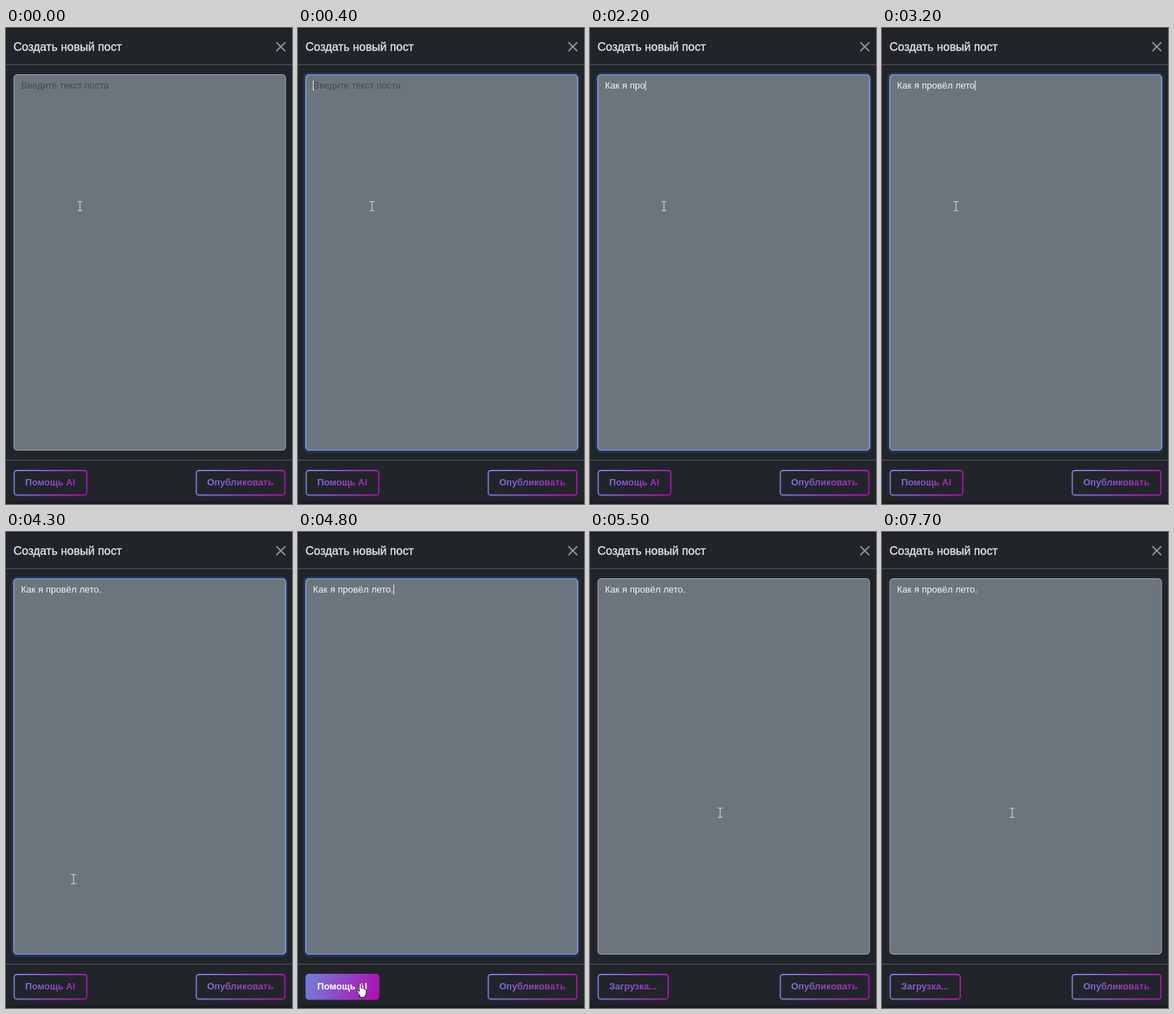
Animation of 402 by 668 pixels, one loop 8000 ms. Source, as an HTML page:

```html
<!DOCTYPE html>
<html lang="ru">
<head>
<meta charset="utf-8">
<style>
  html, body { margin: 0; width: 100%; height: 100%; overflow: hidden; background: #212529; }
  svg { display: block; width: 402px; height: 668px; }
  text { font: 13.07px "Liberation Sans", Arial, sans-serif; white-space: pre; }
  .title { font-size: 16.34px; fill: #e2e5e8; stroke: #e2e5e8; stroke-width: .35px; }
  .label { font-weight: bold; }
</style>
</head>
<body>
<svg viewBox="0 0 402 668">
  <defs>
    <linearGradient id="helpInk" gradientUnits="userSpaceOnUse" x1="11" y1="622" x2="114" y2="655">
      <stop stop-color="#7080dc"/><stop offset="1" stop-color="#b00cb0"/>
    </linearGradient>
    <linearGradient id="postInk" gradientUnits="userSpaceOnUse" x1="267" y1="622" x2="393" y2="655">
      <stop stop-color="#7080dc"/><stop offset="1" stop-color="#b00cb0"/>
    </linearGradient>
  </defs>

  <rect width="402" height="668" fill="#212529"/>
  <rect width="402" height="1" fill="#111417"/>
  <rect y="664" width="402" height="4" fill="#1a1d21"/>
  <path d="M0 51.5H402M0 606.5H402" stroke="#50565b"/>
  <text class="title" x="10.5" y="32">Создать новый пост</text>
  <path d="M380.5 20.5l11.5 11.5M392 20.5l-11.5 11.5" stroke="#909396" stroke-width="1.9" stroke-linecap="round"/>

  <rect id="ring" x="7.5" y="62.5" width="388.5" height="533.5" rx="7" fill="#22345a"/>
  <rect x="11" y="65.5" width="382" height="527" rx="4.5" fill="#6c757d" stroke="#a3abb1"/>
  <rect id="edge" x="11" y="65.5" width="382" height="527" rx="4.5" fill="none" stroke="#7c9fe4"/>
  <text id="hint" x="21.3" y="85" fill="#434a51">Введите текст поста</text>
  <text id="typed" x="21" y="85" fill="#f4f6f8"></text>
  <rect id="caret" y="74" width="1" height="14" fill="#f4f6f8"/>

  <rect id="help" x="11.5" y="621" width="102" height="34.5" rx="3.5" stroke="url(#helpInk)" stroke-width="1.8"/>
  <text id="helpLabel" class="label" x="27" y="642"></text>
  <rect x="267.5" y="621" width="124.5" height="34.5" rx="3.5" fill="none" stroke="url(#postInk)" stroke-width="1.8"/>
  <text class="label" x="282.7" y="642" fill="url(#postInk)">Опубликовать</text>

  <g id="pointer">
    <path id="beam" d="M-3.5 -6.5H-1L0 -5.5L1 -6.5H3.5M0 -5.5V5.5M-3.5 6.5H-1L0 5.5L1 6.5H3.5" fill="none" stroke="#ced2d5" stroke-width="1.2"/>
    <path id="hand" d="M-3 -7Q-1.5 -9 0 -7V-1Q1.5 -2 2.5 -.5Q4 -1 5 .5Q6.5 0 7 2V6Q6.5 9 5 10V12H-2V10Q-4 7 -6 4Q-7 1.5 -4.5 2L-3 4Z" fill="#fff" stroke="#15171a"/>
    <path id="arrow" d="M-4 -7V7L-1 4.5L1 9.5L3.2 8.5L1.2 4H5.5Z" fill="#fff" stroke="#15171a"/>
  </g>
</svg>
<script>
const LOOP = 8000, TICK = 100;
const PHRASE = "Как я провёл лето.";
const KEY_TIMES = [800, 1200, 1300, 1400, 1500, 1700, 1800, 2000, 2200,
                   2300, 2400, 2600, 2700, 2800, 2900, 3000, 3200, 3500];
const BLUR = 4900, LOADING = 4900;
const PATH = [[3900, 104, 250], [4600, 89, 641], [5000, 89, 641], [5400, 183, 394]];

const el = id => document.getElementById(id);
const show = (id, on) => el(id).setAttribute("visibility", on ? "visible" : "hidden");
const clamp = v => Math.max(0, Math.min(1, v));
const ease = v => v * v * (3 - 2 * v);

function pointerAt(t) {
  let [, x, y] = PATH[0];
  for (let i = 1; i < PATH.length; i++) {
    const [t0, x0, y0] = PATH[i - 1], [t1, x1, y1] = PATH[i];
    if (t < t0) break;
    const k = ease(clamp((t - t0) / (t1 - t0)));
    x = x0 + (x1 - x0) * k;
    y = y0 + (y1 - y0) * k;
  }
  return [x, y];
}

function render(t) {
  // Focus ring fades in after the click and out on blur
  const focus = clamp((t - 50) / 150) * (1 - clamp((t - BLUR + 50) / 150));
  el("ring").setAttribute("opacity", focus);
  el("edge").setAttribute("opacity", focus);

  const count = KEY_TIMES.filter(k => k <= t).length;
  const typed = el("typed");
  typed.textContent = PHRASE.slice(0, count);
  show("hint", !count);

  // The caret blink restarts with every key
  const since = t - (count ? KEY_TIMES[count - 1] : 100);
  show("caret", t >= 100 && t < BLUR && since % 1000 < 500);
  el("caret").setAttribute("x", 21 + (count ? typed.getComputedTextLength() : 0));

  const [x, y] = pointerAt(t);
  const inField = y < 594, onHelp = y > 620 && y < 657;
  el("pointer").setAttribute("transform", `translate(${x} ${y})`);
  show("beam", inField);
  show("hand", onHelp);
  show("arrow", !inField && !onHelp);

  const loading = t >= LOADING, filled = onHelp && !loading;
  el("help").setAttribute("width", loading ? 98.5 : 102);
  el("help").setAttribute("fill", filled ? "url(#helpInk)" : "none");
  el("helpLabel").textContent = loading ? "Загрузка..." : "Помощь AI";
  el("helpLabel").setAttribute("fill", filled ? "#fff" : "url(#helpInk)");
}

const start = performance.now();
function frame() {
  const t = (performance.now() - start) % LOOP;
  render(Math.floor(t / TICK) * TICK);
  requestAnimationFrame(frame);
}
frame();
</script>
</body>
</html>
```
